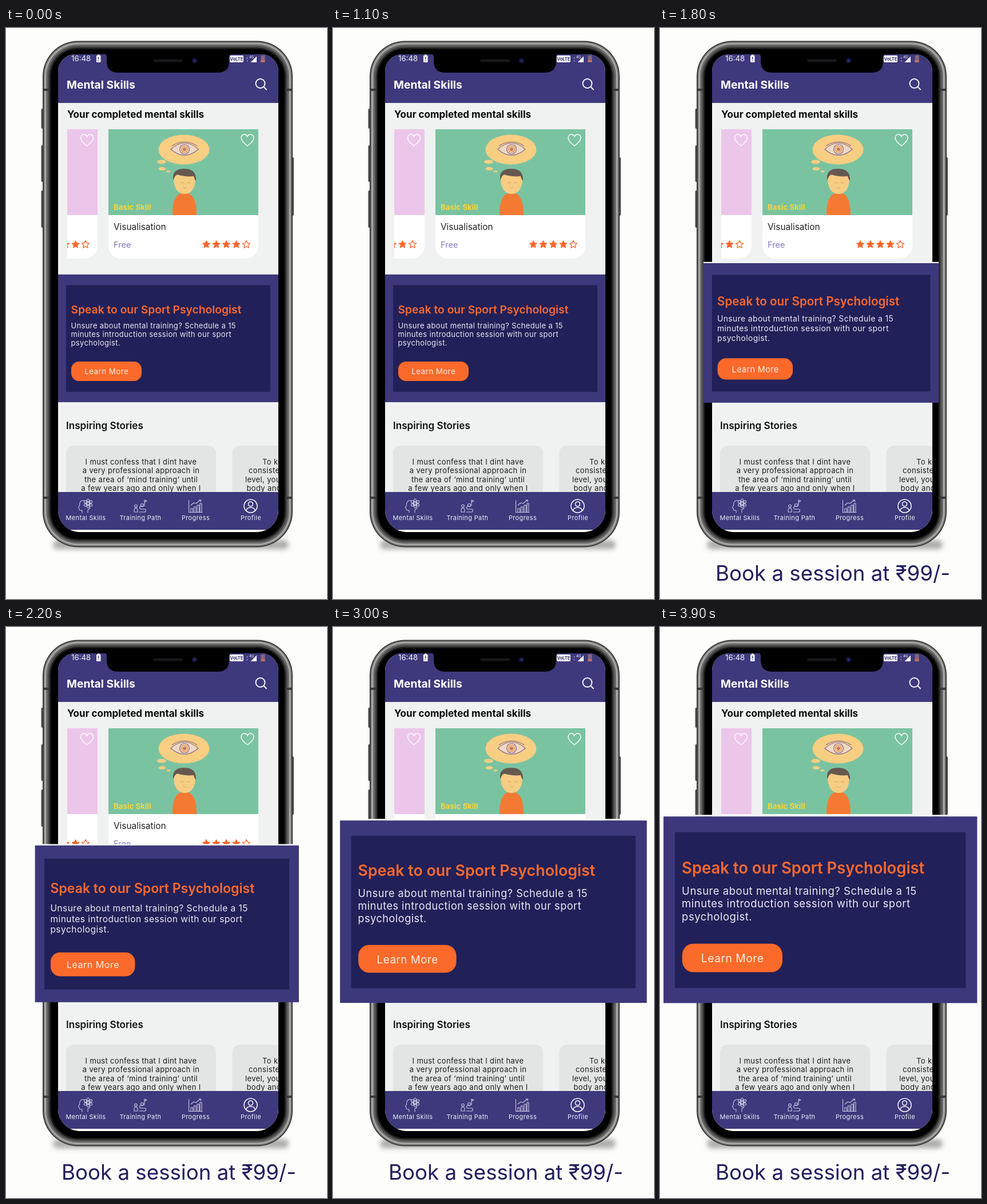
These frames come from a looping animation (561x998 px, 4000 ms). An HTML page:

```html
<!DOCTYPE html>
<html lang="en">
<head>
<meta charset="utf-8">
<title>Mental Skills</title>
<style>
  html, body { margin: 0; width: 100%; height: 100%; overflow: hidden; background: #fdfefc; }
  svg { display: block; width: 561px; height: 998px; font-family: Inter, sans-serif; }
  .bold { font-weight: 700; }
  .semi { font-weight: 600; }
  .body { font-size: 13px; letter-spacing: .36px; }
  .tab { font-size: 11px; letter-spacing: .36px; fill: #eeedf6; text-anchor: middle; }
  .icon { fill: none; stroke: #c9c7e0; stroke-width: 1.1; stroke-linecap: round; stroke-linejoin: round; }
  .mid { text-anchor: middle; }
  #late { visibility: hidden; }
</style>
</head>
<body>
<svg viewBox="0 0 561 998">
  <defs>
    <filter id="blur" x="-10%" y="-150%" width="120%" height="400%"><feGaussianBlur stdDeviation="4"/></filter>
    <clipPath id="screen">
      <path d="M121 46H446A30 30 0 0 1 476 76V843A38 38 0 0 1 438 881H129A38 38 0 0 1 91 843V76A30 30 0 0 1 121 46z"/>
    </clipPath>
    <clipPath id="list"><rect x="107" y="170" width="369" height="240"/></clipPath>
    <path id="star" d="M0-7L1.94-2.67 6.66-2.16 3.14 1.02 4.11 5.66 0 3.3-4.11 5.66-3.14 1.02-6.66-2.16-1.94-2.67z" stroke="#f9662b" stroke-linejoin="round"/>
    <path id="heart" d="M0 10C-8 4-11 0-11-4C-11-8-8-10-5.5-10C-3-10-1-8.5 0-6C1-8.5 3-10 5.5-10C8-10 11-8 11-4C11 0 8 4 0 10z" fill="none" stroke="#fff" stroke-width="1.4"/>
    <g id="banner">
      <rect x="91" y="430.8" width="385" height="223.2" fill="#3d387b"/>
      <rect x="105" y="449.5" width="357" height="186.5" fill="#222058"/>
      <text class="semi" x="113.5" y="498.8" font-size="19.25" fill="#f9692f">Speak to our Sport Psychologist</text>
      <g class="body" fill="#e9e8f3">
        <text x="113.5" y="524.5">Unsure about mental training? Schedule a 15</text>
        <text x="113.5" y="539.8">minutes introduction session with our sport</text>
        <text x="113.5" y="555">psychologist.</text>
      </g>
      <rect x="114" y="583" width="123" height="34" rx="13.5" fill="#fb6a2a"/>
      <text class="mid" x="175.7" y="605.3" font-size="13.5" letter-spacing=".37" fill="#fdeee6">Learn More</text>
    </g>
  </defs>

  <rect width="561" height="998" fill="#fdfefc"/>

  <!-- phone body -->
  <rect x="82" y="895" width="412" height="16" rx="8" fill="#8a8a88" opacity=".7" filter="url(#blur)"/>
  <g fill="#4b4b4a">
    <rect x="61.5" y="141" width="5" height="35" rx="2"/>
    <rect x="61.5" y="205" width="5" height="64" rx="2"/>
    <rect x="61.5" y="284" width="5" height="65" rx="2"/>
    <rect x="498.5" y="226" width="4.5" height="102" rx="2"/>
  </g>
  <g id="shell"></g>
  <path d="M64.500 108h12M488 108h12M64.500 821h12M488 821h12" stroke="#3a3a3a" stroke-width="4"/>

  <g clip-path="url(#screen)">
    <rect x="91" y="46" width="385" height="835" fill="#f0f1f1"/>

    <!-- header -->
    <rect x="91" y="46" width="385" height="85" fill="#3d397c"/>
    <text x="114" y="58.3" font-size="13.3" fill="#f2f1f8">16:48</text>
    <g fill="#fff">
      <rect x="158" y="48" width="7.5" height="12" rx="1"/>
      <rect x="160" y="46.5" width="3.5" height="2"/>
      <rect x="391" y="48" width="24" height="12" rx="2"/>
      <path d="M438 49.5V60H427.5z"/>
      <text x="425" y="52.5" font-size="6">4G</text>
    </g>
    <path d="M161.7 50.5v4.500M161.7 56.7v1.3" stroke="#3d397c" stroke-width="1.5"/>
    <text class="mid bold" x="403" y="57.2" font-size="7.5" fill="#35316e">VoLTE</text>
    <path d="M421.5 51v2.500M421.5 56v2.5" stroke="#9e9bc4" stroke-width="1.5"/>
    <rect x="445.5" y="48" width="7" height="12" fill="#8a6480"/>
    <rect x="445.5" y="56" width="7" height="4" fill="#c4705f"/>
    <text class="bold" x="106" y="105.8" font-size="19.3" fill="#fff">Mental Skills</text>
    <g fill="none" stroke="#f5f4fa" stroke-width="2" stroke-linecap="round">
      <circle cx="444.5" cy="97" r="8"/>
      <path d="M450.3 102.8L455 107.5"/>
    </g>

    <!-- completed skills -->
    <text class="bold" x="107" y="157.3" font-size="17.05" fill="#0b0b0b">Your completed mental skills</text>
    <g clip-path="url(#list)">
      <path d="M90 177H160V381A22 22 0 0 1 138 403H90z" fill="#fff"/>
      <rect x="90" y="177" width="70" height="150" fill="#ecc6ea"/>
      <path d="M179 177H441V381A22 22 0 0 1 419 403H201A22 22 0 0 1 179 381z" fill="#fff"/>
      <rect x="179" y="177" width="262" height="150" fill="#7ac3a1"/>
      <g id="stars"></g>
    </g>
    <use href="#heart" x="141.5" y="196"/>
    <use href="#heart" x="422" y="196"/>

    <g fill="#f8ce82">
      <ellipse cx="311" cy="212.5" rx="44.5" ry="26"/>
      <ellipse cx="272" cy="234" rx="8" ry="3.5"/>
      <ellipse cx="273" cy="246" rx="6.5" ry="3"/>
      <ellipse cx="284" cy="250.8" rx="3.5" ry="1.7"/>
    </g>
    <g stroke="#85688a" stroke-width="1.1" fill="none">
      <path d="M288 212Q312 190 336 212Q312 233 288 212z" fill="#eed8c4"/>
      <path d="M290 206Q312 192 334 206"/>
      <circle cx="312" cy="212" r="8.5" fill="#efcfae"/>
      <circle cx="312" cy="212" r="5.5" fill="#f6c07c" stroke="#df8a5c"/>
      <circle cx="312" cy="212" r="2" fill="#e2794c"/>
    </g>
    <path d="M291 327C291 305 295 288 312 288C329 288 333 305 333 327z" fill="#f47a33"/>
    <path d="M293 262C293 282 302 290 312 290C323 290 331 282 331 262C326 252 298 252 293 262z" fill="#f7cd83"/>
    <path d="M292 263C291 251 299 246 311 246C324 246 333 251 332 267C330 265 329 263 328 259C319 260 307 259 299 256C296 258 294 260 293 266z" fill="#67584f"/>
    <path d="M305 270q3 2 6 0M316 270q3 2 6 0M309 279q4 2 7 0" fill="none" stroke="#d9a566"/>

    <text class="bold" x="188" y="317.6" font-size="13.25" fill="#f6d53a">Basic Skill</text>
    <text x="188" y="353" font-size="15.4" fill="#222">Visualisation</text>
    <text x="188" y="384" font-size="14.6" fill="#8079bd">Free</text>

    <use href="#banner"/>

    <!-- stories -->
    <text class="semi" x="105" y="700.5" font-size="17.1" fill="#101010">Inspiring Stories</text>
    <rect x="105" y="730" width="262" height="120" rx="13" fill="#e3e4e4"/>
    <rect x="395.5" y="730" width="120" height="120" rx="13" fill="#e3e4e4"/>
    <g id="quotes" class="body" fill="#1d1d1d"></g>

    <!-- tab bar -->
    <rect x="91" y="811" width="385" height="66" fill="#3d397c"/>
    <rect x="91" y="877" width="385" height="4" fill="#fff"/>
    <g class="icon">
      <path d="M133 847v-4h-3q-2 0-2-3l-1.5-2 2-3.500C128 827 133 825 137 826M143 847v-5q3-1 4-4" stroke-dasharray="3 1"/>
      <circle cx="143.5" cy="831" r="2"/>
      <g id="atom"></g>
      <circle cx="227" cy="835.5" r="2.3"/>
      <path d="M224 846v-5q3-4 6 0v5zM233 846h10q3-3 0-5h-8q-3-3 0-5h5M242 835v-10l4 1.5-4 2.5"/>
      <circle cx="238" cy="834" r="2.5"/>
      <path d="M319.5 825.5V846.5H343M323 846v-6h3.5v6M328.5 846v-9h3.5v9M334 846v-12h3.5v12M339 846v-15h3v15M323 834l5-4 4 1 8-6M337 825h3.5v3"/>
      <g stroke="#f2f1f8" stroke-width="1.6">
        <circle cx="427.5" cy="835.5" r="11.5"/>
        <circle cx="427.5" cy="832" r="4"/>
        <path d="M419.5 843.5Q421 838 427.5 838T435.5 843.5"/>
      </g>
    </g>
    <text class="tab" x="139.5" y="860">Mental Skills</text>
    <text class="tab" x="235" y="860">Training Path</text>
    <text class="tab" x="331.5" y="860">Progress</text>
    <text class="tab" x="428" y="860">Profile</text>
  </g>

  <!-- notch -->
  <path d="M172 45Q176 46 176 51V58Q176 78 196 78H370Q390 78 390 58V51Q390 46 394 45z" fill="#000"/>
  <rect x="257" y="54.5" width="52" height="5" rx="2.5" fill="#17171a"/>
  <circle cx="329.5" cy="57" r="5" fill="#11122c"/>
  <circle cx="329.5" cy="57" r="2.2" fill="#2b2f78"/>

  <g id="late">
    <g id="zoom">
      <rect x="91" y="428.8" width="385" height="2.2" fill="#f4f4f6"/>
      <use href="#banner"/>
    </g>
    <text x="97" y="966" font-size="36.7" fill="#221e5e">Book a session at ₹99/-</text>
  </g>
</svg>
<script>
  const LOOP = 4000, STEP = 100, CUE = 1200;
  const $ = id => document.getElementById(id);

  // nested metal rings, each given by its inset from the outer edge
  const rings = [[0, '#3a3a3a'], [2, '#858584'], [4, '#b0b0ae'], [6, '#6c6c6b'], [9, '#484847'], [12, '#1c1c1c'], [14.5, '#000']];
  $('shell').innerHTML = rings.map(([d, fill]) =>
    `<rect x="${64 + d}" y="${22.5 + d}" width="${437 - 2 * d}" height="${885 - 2 * d}" rx="${62 - d}" fill="${fill}"/>`).join('');

  const star = (x, full) =>
    `<use href="#star" x="${x}" y="378.5" fill="${full ? '#f9662b' : '#fff'}"
      ${full ? '' : 'stroke-width="1.3"'}/>`;
  const rating = right => [4, 3, 2, 1, 0].map(i => star(right - i * 17.5, i > 0)).join('');
  $('stars').innerHTML = rating(139) + rating(420);

  $('atom').innerHTML = [0, 60, 120].map(a =>
    `<ellipse cx="143.5" cy="831" rx="8" ry="3.2" transform="rotate(${a + 30} 143.5 831)"/>`).join('');

  const quotes = [
    ['I must confess that I dint have', 'To keep', 448],
    ['a very professional approach in', 'consistent', 424],
    ['the area of ‘mind training’ until', 'level, you', 418],
    ['a few years ago and only when I', 'body and', 420.5]
  ];
  $('quotes').innerHTML = quotes.map(([left, right, x], i) => {
    const y = 763 + i * 15.3;
    return `<text class="mid" x="236" y="${y}">${left}</text><text x="${x}" y="${y}">${right}</text>`;
  }).join('');

  const zoom = $('zoom').animate([
    { transform: 'translate(-1.5px, -13.9px) scale(1, 1.022)' },
    { transform: 'translate(-123.5px, -298.2px) scale(1.424, 1.461)' }
  ], { delay: CUE, duration: 2400, easing: 'cubic-bezier(.41, 0, .41, 1)', fill: 'both' });
  zoom.pause();

  const start = performance.now();
  function draw() {
    const t = Math.floor((performance.now() - start) / STEP) * STEP % LOOP;
    $('late').style.visibility = t >= CUE ? 'visible' : 'hidden';
    zoom.currentTime = t;
    requestAnimationFrame(draw);
  }
  draw();
</script>
</body>
</html>
```
